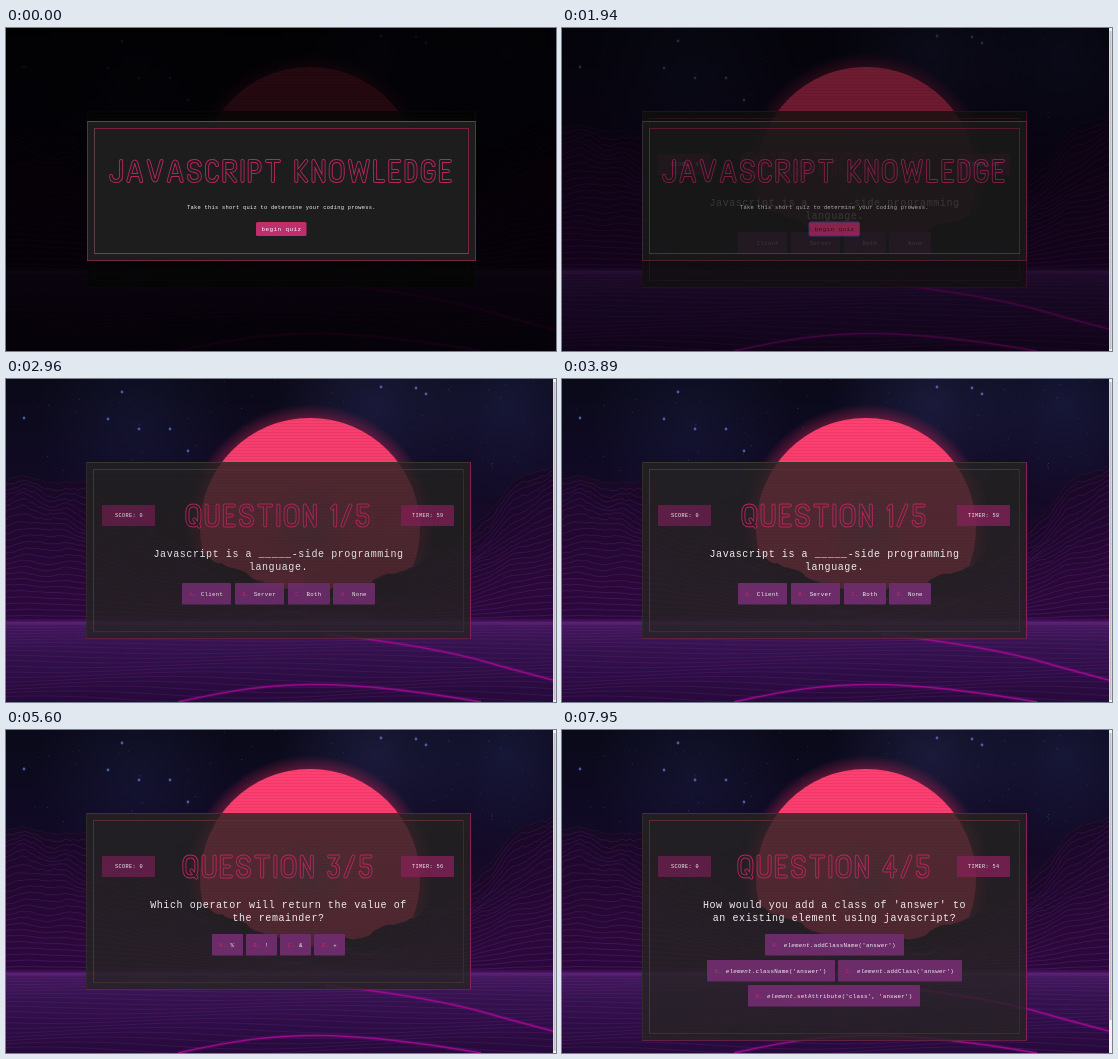
An HTML page with a canvas for the animation above (8 s loop, 550 by 323 pixels).

```html
<!DOCTYPE html>
<html lang="en">
<head>
<meta charset="utf-8">
<title>Quiz</title>
<style>
  html, body { margin: 0; width: 100%; height: 100%; overflow: hidden; background: #000; }
  canvas, svg { position: absolute; left: 0; top: 0; display: block; }
  text { font-family: "Liberation Mono", monospace; white-space: pre; }
</style>
</head>
<body>
<canvas id="scene" width="550" height="323"></canvas>
<svg id="ui" width="550" height="323" viewBox="0 0 550 323"></svg>
<script>
const LOOP = 8000;
const PINK = '#b8265e';

// ---------- landscape, painted once ----------
const ctx = document.getElementById('scene').getContext('2d');
let seed = 7;
const random = () => (seed = (seed * 16807) % 2147483647) / 2147483647;

function linear(y0, y1, ...colors) {
  const g = ctx.createLinearGradient(0, y0, 0, y1);
  colors.forEach((c, i) => g.addColorStop(i / (colors.length - 1), c));
  return g;
}

function glow(x, y, inner, outer, color) {
  const g = ctx.createRadialGradient(x, y, inner, x, y, outer);
  g.addColorStop(0, `rgba(${color})`);
  g.addColorStop(1, `rgba(${color.replace(/[^,]+$/, '0')})`);
  ctx.fillStyle = g;
  ctx.fillRect(0, 0, 550, 323);
}

function disc(x, y, r, color) {
  ctx.fillStyle = color;
  ctx.beginPath();
  ctx.arc(x, y, r, 0, 7);
  ctx.fill();
}

function paintSky() {
  ctx.fillStyle = linear(0, 243, '#0a0a19', '#0f0a23', '#190a2b', '#2c0d45');
  ctx.fillRect(0, 0, 550, 323);
  glow(130, 45, 0, 100, '34,40,84,.3');
  glow(370, 25, 0, 100, '48,48,100,.42');
  glow(500, 25, 0, 100, '38,40,92,.42');
  for (let i = 0; i < 130; i++)
    disc(random() * 550, random() * 100, .5, `rgba(110,125,190,${random() * .45})`);
  for (const [x, y] of [[133, 50], [116, 13], [102, 40], [164, 50], [182, 72], [18, 39], [410, 9], [420, 15], [375, 8]])
    disc(x, y, 1.4, 'rgba(95,120,205,.75)');
}

function paintSun() {
  glow(304, 149, 106, 124, '200,38,85,.5');
  disc(304, 149, 110, linear(39, 259, '#ff4071', '#f63a6b', '#e02f62'));
  glow(304, 148, 0, 45, '120,80,120,.45');
  ctx.fillStyle = 'rgba(90,10,50,.1)';
  for (let y = 41; y < 259; y += 3) {
    const half = Math.sqrt(Math.max(0, 110 ** 2 - (y - 149) ** 2)) + 5;
    ctx.fillRect(304 - half, y, half * 2, 1);
  }
}

const ridge = [[0, 99], [18, 91], [42, 100], [60, 97], [90, 112], [150, 145], [196, 172], [228, 194],
  [290, 210], [365, 207], [415, 180], [466, 150], [486, 132], [505, 108], [526, 96], [550, 80]];

function ridgeY(x) {
  const i = Math.max(1, ridge.findIndex(p => p[0] >= x));
  const [[x0, y0], [x1, y1]] = [ridge[i - 1], ridge[i]];
  return y0 + (y1 - y0) * (x - x0) / (x1 - x0);
}

function paintHills() {
  const rows = 24;
  for (let row = 0; row < rows; row++) {
    const drop = row / rows;
    ctx.beginPath();
    for (let x = 0; x <= 550; x += 4) {
      const top = ridgeY(x);
      const bump = Math.sin(x * .13 + row * .6) * 2 + Math.sin(x * .047 - row * .4) * 4 + random() * 3;
      ctx.lineTo(x, top + (243 - top) * drop + bump * (1 - drop));
    }
    ctx.strokeStyle = `rgba(120,50,150,${.32 + drop * .12})`;
    ctx.lineWidth = .7;
    ctx.stroke();
    ctx.lineTo(550, 243);
    ctx.lineTo(0, 243);
    ctx.fillStyle = row ? 'rgba(52,14,76,.06)' : '#180925';
    ctx.fill();
  }
}

function paintFloor() {
  ctx.fillStyle = linear(243, 323, '#43195f', '#34124f', '#2d0d46', '#260a3a');
  ctx.fillRect(0, 243, 550, 80);
  ctx.lineWidth = .6;
  for (let i = 0; i < 20; i++) {
    const y = 244 + 82 * (i / 20) ** 1.3;
    ctx.beginPath();
    for (let x = 0; x <= 550; x += 10)
      ctx.lineTo(x, y + Math.sin(x * .017 + i * .55) * i * .2);
    ctx.strokeStyle = 'rgba(130,50,140,.35)';
    ctx.stroke();
  }
  ctx.fillStyle = linear(239, 247, 'rgba(120,45,150,0)', 'rgba(120,45,150,.45)', 'rgba(120,45,150,0)');
  ctx.fillRect(0, 239, 550, 8);
  const roads = ['M320 255C390 263 450 274 484 284S530 296 550 302', 'M172 323C230 310 265 305.5 310 305.5S420 313 475 323'];
  for (const road of roads)
    for (const [width, color] of [[4, 'rgba(150,10,140,.22)'], [1.5, '#990a8c']]) {
      ctx.lineWidth = width;
      ctx.strokeStyle = color;
      ctx.stroke(new Path2D(road));
    }
}

paintSky();
paintSun();
paintHills();
paintFloor();

// ---------- hollow title lettering: [width, centre line] ----------
const ROUND = 'M8 2Q14 2 14 9V15Q14 22 8 22Q2 22 2 15V9Q2 2 8 2Z';
const GLYPHS = {
  J: [14, 'M12 2V16Q12 22 7 22Q2 22 2 17'],
  A: [17, 'M2 22L7 4Q8.5 1 10 4L15 22M5 16H12'],
  V: [17, 'M2 2L7 20Q8.5 23 10 20L15 2'],
  S: [15, 'M13 6Q12 2 7.5 2Q2 2 2 7Q2 11 7.5 12Q13 13 13 17Q13 22 7.5 22Q2 22 2 17'],
  C: [14, 'M12 6Q11 2 7 2Q2 2 2 8V16Q2 22 7 22Q11 22 12 18'],
  R: [15, 'M2 22V2H8Q13 2 13 7Q13 12 8 12H5L13 22'],
  I: [4, 'M2 2V22'],
  P: [14, 'M2 22V2H7Q12 2 12 7.5Q12 13 7 13H5'],
  T: [16, 'M2 2H14M8 2V22'],
  K: [14, 'M2 2V22M12 2L4 12L12 22'],
  N: [14, 'M2 22V2L12 22V2'],
  O: [16, ROUND],
  Q: [16, ROUND + 'M9 16L14 23'],
  U: [15, 'M2 2V16Q2 22 7.5 22Q13 22 13 16V2'],
  W: [22, 'M2 2L6 22L11 4L16 22L20 2'],
  L: [12, 'M2 2V22H10'],
  E: [13, 'M11 2H2V22H11M2 12H9'],
  D: [13, 'M2 2H5Q11 2 11 9V15Q11 22 5 22H2Z'],
  G: [15, 'M13 6Q12 2 7.5 2Q2 2 2 9V15Q2 22 7.5 22Q13 22 13 16V13H8'],
  1: [7, 'M2 5L5 2V22'],
  2: [14, 'M2 7Q2 2 7 2Q12 2 12 7Q12 10 9 13L2 22H12'],
  3: [13, 'M2 2H11L6 10Q11 10 11 16Q11 22 6 22Q2 22 2 18'],
  4: [15, 'M10 22V2L2 16H13'],
  5: [14, 'M12 2H3V11H7Q12 11 12 16Q12 22 7 22Q3 22 2 18'],
  '/': [12, 'M2 22L10 2'],
  ' ': [7, '']
};
const GAP = 3.2;
let maskCount = 0;

function title(str, centre, y) {
  const total = [...str].reduce((sum, c) => sum + GLYPHS[c][0] + GAP, -GAP);
  const id = 'title' + maskCount++;
  let x = centre - total / 2;
  let paths = '';
  for (const c of str) {
    paths += `<path transform="translate(${x} 0)" d="${GLYPHS[c][1]}"/>`;
    x += GLYPHS[c][0] + GAP;
  }
  const layer = (color, width) => `<g transform="translate(0 ${y})" stroke="${color}" stroke-width="${width}">${paths}</g>`;
  return `<mask id="${id}" maskUnits="userSpaceOnUse" x="0" y="0" width="550" height="323">
    <g fill="none" stroke-linecap="round" stroke-linejoin="round">${layer('#fff', 4)}${layer('#000', 2.2)}</g></mask>
    <rect aria-label="${str}" x="${centre - 200}" y="${y - 2}" width="400" height="30" fill="${PINK}" mask="url(#${id})"/>`;
}

// ---------- interface ----------
const rect = (x, y, w, h, fill, more = '') => `<rect x="${x}" y="${y}" width="${w}" height="${h}" fill="${fill}" ${more}/>`;

const text = (x, y, str, size, advance, more = 'fill="#f1edf1"') =>
  `<text x="${x}" y="${y}" font-size="${size}" letter-spacing="${advance - size * .6}" ${more}>${str}</text>`;

const centred = (cx, y, str, size, advance, more) => text(cx - str.length * advance / 2, y, str, size, advance, more);

const border = (x, y, w, h, [top, right, bottom, left]) =>
  rect(x, y, w, 1, top) + rect(x, y, 1, h, left) + rect(x + w - 1, y, 1, h, right) + rect(x, y + h - 1, w, 1, bottom);

function intro(id, x, w) {
  const cx = x + w / 2;
  return `<g id="${id}">` + rect(x, 93, w, 140, '#1d1d1d', 'rx="1"') +
    border(x, 93, w, 140, ['#5c4a4c', '#762640', '#762640', '#453c3f']) +
    border(x + 7, 100, w - 14, 126, ['#7d2140', '#7d2140', '#5a5053', '#5c414a']) +
    title('JAVASCRIPT KNOWLEDGE', cx - 1, 131) +
    centred(cx, 181, 'Take this short quiz to determine your coding prowess.', 5.4, 3.5) +
    rect(cx - 25.5, 194, 50.5, 14, '#c02e6b', 'rx="1.5" class="button"') +
    centred(cx, 203, 'begin quiz', 6, 4, 'class="label"') + '</g>';
}

const CARD = { x: 80, y: 83, w: 385, centre: 272.5 };
const QUESTIONS = [
  { at: 0, lines: ['Javascript is a _____-side programming', 'language.'],
    rows: [['Client', 'Server', 'Both', 'None']] },
  { at: 4130, lines: ["Which of the following will write 'Help'", 'in an alert box?'],
    rows: [["alertBox('Help')", 'alert(Help)', "alertText('Help')"], ["alert('Help')"]] },
  { at: 5530, lines: ['Which operator will return the value of', 'the remainder?'],
    rows: [['%', '!', '&', '+']] },
  { at: 7170, lines: ["How would you add a class of 'answer' to", 'an existing element using javascript?'],
    rows: [["element.addClassName('answer')"], ["element.className('answer')", "element.addClass('answer')"],
      ["element.setAttribute('class', 'answer')"]] }
];

function options(rows) {
  const advance = 3.73, gap = 3.5;
  const width = s => 27 + s.length * advance;
  let letter = 0, out = '';
  rows.forEach((row, r) => {
    const y = Math.round(204.2 + r * 25.5);
    let x = CARD.centre - (row.reduce((sum, s) => sum + width(s) + gap, -gap)) / 2;
    for (const s of row) {
      const label = s.replace('&', '&amp;').replace(/^element/, '<tspan font-style="italic">element</tspan>');
      out += rect(Math.round(x), y, Math.round(width(s)), 21.5, '#6c2c69', 'rx="1"') +
        text(x + 7.5, y + 13, 'ABCD'[letter++] + '.', 5.6, advance, 'fill="#c9286c"') +
        text(x + 18.8, y + 13, label, 5.8, advance);
      x += width(s) + gap;
    }
  });
  return out;
}

function question({ lines, rows }, i) {
  const { x, y, w, centre } = CARD;
  const h = 177 + (rows.length - 1) * 25.5;
  return `<g class="question">` + rect(x, y, w, h, 'rgba(38,36,34,.79)') +
    border(x, y, w, h, ['#3c3531', '#8a1f5c', '#5e2244', '#312a2c']) +
    border(x + 7, y + 7, w - 14, h - 14, ['#5c2c32', '#3a2c2c', '#3c2f33', '#4a343c']) +
    title(`QUESTION ${i + 1}/5`, centre - 1, 124.5) +
    lines.map((line, n) => centred(centre, 178 + n * 13, line, 10, 6.58)).join('') + options(rows) + '</g>';
}

const ui = document.getElementById('ui');
ui.innerHTML = '<g id="quiz">' + QUESTIONS.map(question).join('') +
  rect(96, 126, 53, 21, 'rgba(122,30,88,.68)', 'rx="1"') + text(109, 138.3, 'SCORE: 0', 5.2, 3.5) +
  rect(395, 126, 53, 21, 'rgba(134,32,88,.75)', 'rx="1"') + text(406, 138.3, '', 5.2, 3.5, 'id="timer" fill="#f1edf1"') +
  rect(205.5, 203.5, 31, 22, 'none', 'rx="1" stroke="#fff" id="focus"') + '</g>' +
  rect(0, 0, 550, 323, '#000', 'id="dim"') +
  intro('introWide', 81, 389) + intro('introNarrow', 80, 385) +
  '<g id="scrollbar">' + rect(547, 0, 3, 323, '#f1f1f1') + rect(547.5, 3, 2, 0, '#c1c1c1', 'id="thumb"') + '</g>';

const el = id => document.getElementById(id);
const show = (node, on) => { node.style.display = on ? '' : 'none'; };
const clamp = v => Math.min(1, Math.max(0, v));
const questionNodes = [...ui.querySelectorAll('.question')];
const labels = [...ui.querySelectorAll('.label')];
el('introNarrow').querySelector('.button').setAttribute('stroke', '#3c4a94');

// CSS "ease" curve
function ease(x) {
  let lo = 0, hi = 1, u = .5;
  for (let i = 0; i < 20; i++, u = (lo + hi) / 2) {
    if (.75 * u * (1 - u) + u ** 3 < x) lo = u; else hi = u;
  }
  return .3 * u * (1 - u) ** 2 + 3 * u * u * (1 - u) + u ** 3;
}

const CLICK = 1550, FADE = 1710, STEP = 78;
const TICKS = [2570, 3580, 4510, 5530, 6540, 7560];

function render(t) {
  const started = t >= CLICK;
  const held = t < FADE ? CLICK : FADE + STEP * Math.floor((t - FADE) / STEP);
  const fade = started ? ease(clamp((held - 1440) / 1920)) : 0;

  el('dim').setAttribute('opacity', .86 * (1 - fade));
  el('introNarrow').setAttribute('opacity', 1 - fade);
  show(el('introWide'), !started);
  show(el('introNarrow'), started && fade < 1);
  show(el('scrollbar'), started);
  el('quiz').setAttribute('transform', started ? '' : 'translate(.2 0) scale(1.0104 1)');

  const hover = t < 610 ? 0 : t < 690 ? 1 / 3 : t < 770 ? 2 / 3 : 1;
  const mix = (a, b) => Math.round(a + (b - a) * hover);
  labels.forEach(l => l.setAttribute('fill', `rgb(${mix(255, 66)},${mix(245, 18)},${mix(250, 42)})`));

  const current = QUESTIONS.filter(q => t >= q.at).length - 1;
  questionNodes.forEach((node, i) => show(node, i === current));
  el('thumb').setAttribute('height', QUESTIONS[current].rows.length > 2 ? 287 : 318);
  el('timer').textContent = 'TIMER: ' + (60 - TICKS.filter(tick => t >= tick).length);
  show(el('focus'), t >= 7010 && t < 7170);
}

const start = performance.now();
function loop() {
  render((performance.now() - start) % LOOP);
  requestAnimationFrame(loop);
}
loop();
</script>
</body>
</html>
```
